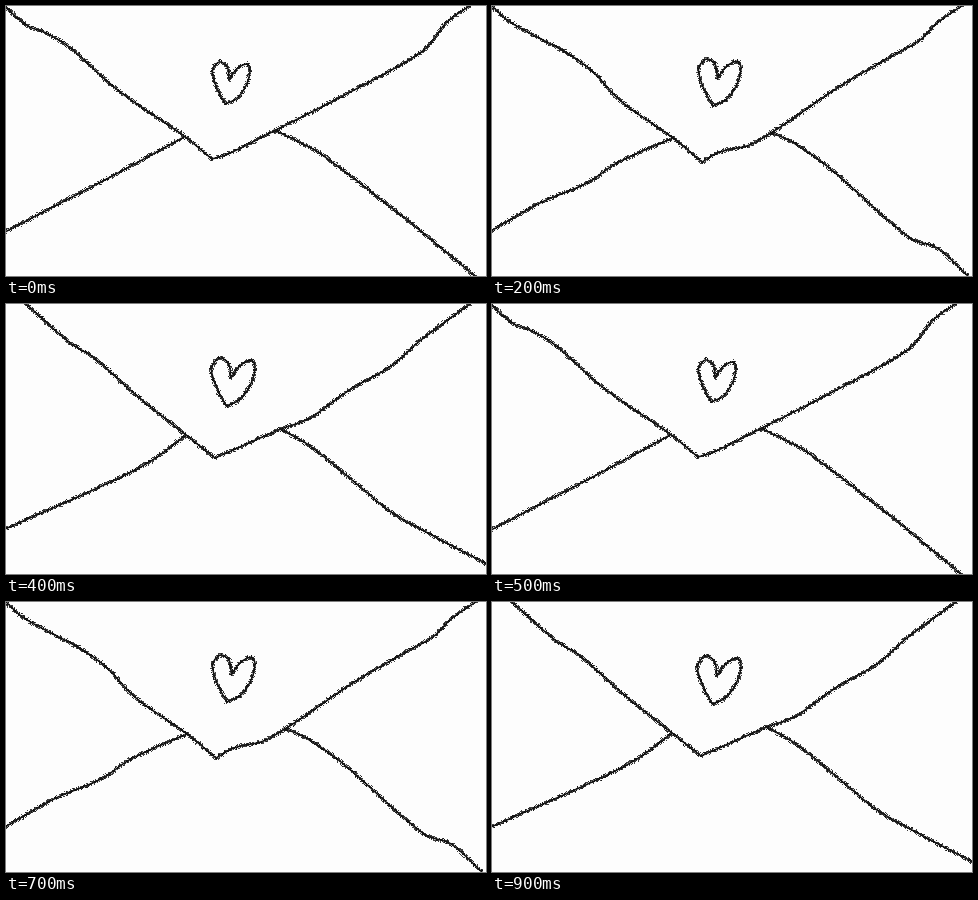
An HTML page with a canvas for the animation above (1 s loop, 480 by 270 pixels).

```html
<!DOCTYPE html>
<html lang="en">
<head>
<meta charset="utf-8">
<title>Envelope</title>
<style>
html, body { margin: 0; width: 100%; height: 100%; overflow: hidden; background: #fdfdfd; }
canvas { display: block; }
</style>
</head>
<body>
<canvas id="stage" width="480" height="270"></canvas>
<script>
const W = 480, H = 270, STEP = 100;

const points = text => text.split(' ').map(p => p.split(',').map(Number));

// Both halves of a heart in a unit box, drawn from the notch round to the notch
const heartHalves = [
  '.45,.42 .4,.12 .2,0 .02,.18 .05,.42 .2,.76 .35,1',
  '.35,1 .66,.86 .9,.55 1,.2 .92,.05 .66,.16 .45,.42'
].map(points);

// The flap runs from its tip to the left and right; two seams meet it from below
function pose(tip, left, right, seamLeft, seamRight, [x, y, w, h]) {
  return [
    points(tip + ' ' + left), points(tip + ' ' + right),
    points(seamLeft), points(seamRight),
    ...heartHalves.map(half => half.map(([u, v]) => [x + u * w, y + v * h]))
  ];
}

const poseA = pose('206,153',
  '178,130 113,85 63,41 40,27 22,20 -1,1',
  '222,148 268,125 350,83 408,51 424,38 441,16 465,-1',
  '178,131 125,160 95,176 45,202 -1,226',
  '268,124 295,137 315,148 400,213 435,242 470,271',
  [206, 56, 38, 42]);

const poseB = pose('210,156',
  '181,132 130,96 100,65 75,47 18,16 -1,-1',
  '228,146 262,137 350,79 400,50 428,34 445,17 471,-1',
  '181,132 125,157 95,177 48,197 -1,225',
  '278,126 300,136 335,160 418,232 445,242 477,271',
  [206, 53, 43, 47]);

const poseC = pose('215,157',
  '178,131 155,107 85,59 58,26 19,-1',
  '278,123 335,94 380,61 479,-1',
  '178,132 125,160 85,176 60,189 -1,223',
  '278,124 325,163 352,183 378,196 405,217 481,263',
  [204, 54, 43, 49]);

const poseD = pose('209,154',
  '180,131 130,91 88,54 63,38 19,-1',
  '275,125 302,115 345,85 385,62 415,36 465,-1',
  '180,131 145,157 100,180 -1,225',
  '274,125 304,142 358,186 385,208 435,236 481,260',
  [205, 54, 44, 48]);

const between = (a, b) => a.map((line, i) => line.map((p, j) =>
  p.map((v, k) => (v + b[i][j][k]) / 2)));

const poses = [poseA, between(poseA, poseB), poseB, poseC, poseD];

function random(seed) {
  return () => {
    seed = (seed * 1664525 + 1013904223) >>> 0;
    return seed / 4294967296;
  };
}

const dist = (a, b) => Math.hypot(b[0] - a[0], b[1] - a[1]);
const slope = (a, b, c, j) => (c[j] - a[j]) / (dist(a, b) + dist(b, c));

// Smooth curve through the points, four samples per pixel
function trace(pts) {
  const out = [];
  for (let i = 0; i + 1 < pts.length; i++) {
    const b = pts[i], c = pts[i + 1];
    const a = pts[i - 1] || b, d = pts[i + 2] || c;
    const len = dist(b, c), n = Math.ceil(len * 4);
    for (let k = 0; k < n; k++) {
      const t = k / n, s = 1 - t;
      out.push([0, 1].map(j =>
        s * s * (1 + 2 * t) * b[j] + t * t * (1 + 2 * s) * c[j] +
        len * t * s * (s * slope(a, b, c, j) - t * slope(b, c, d, j))));
    }
  }
  return out;
}

// Crayon line: a thin core with pixel grains scattered around a drifting centre
function crayon(ctx, pts, rnd) {
  const path = trace(pts);
  ctx.beginPath();
  path.forEach(p => ctx.lineTo(...p));
  ctx.stroke();
  let dx = 0, dy = 0;
  path.forEach(([x, y], i) => {
    if (i % 12 === 0) {
      dx = rnd() - 0.5;
      dy = rnd() - 0.5;
    }
    const r = 2.2 * Math.sqrt(rnd()), angle = rnd() * 2 * Math.PI;
    ctx.fillRect(Math.floor(x + dx + r * Math.cos(angle)),
      Math.floor(y + dy + r * Math.sin(angle)), 1, 1);
  });
}

function render(lines, index) {
  const sheet = document.createElement('canvas');
  sheet.width = W;
  sheet.height = H;
  const ctx = sheet.getContext('2d');
  ctx.fillStyle = '#fdfdfd';
  ctx.fillRect(0, 0, W, H);
  ctx.fillStyle = 'rgba(16, 16, 16, 0.8)';
  ctx.strokeStyle = '#1c1c1c';
  ctx.lineWidth = 1.6;
  ctx.lineCap = ctx.lineJoin = 'round';
  const rnd = random(index * 97 + 11);
  lines.forEach(line => crayon(ctx, line, rnd));
  return sheet;
}

const sheets = poses.map(render);
const stage = document.getElementById('stage').getContext('2d');
const start = performance.now();

function tick() {
  const step = Math.floor((performance.now() - start) / STEP);
  stage.drawImage(sheets[step % sheets.length], 0, 0);
  requestAnimationFrame(tick);
}
tick();
</script>
</body>
</html>
```
